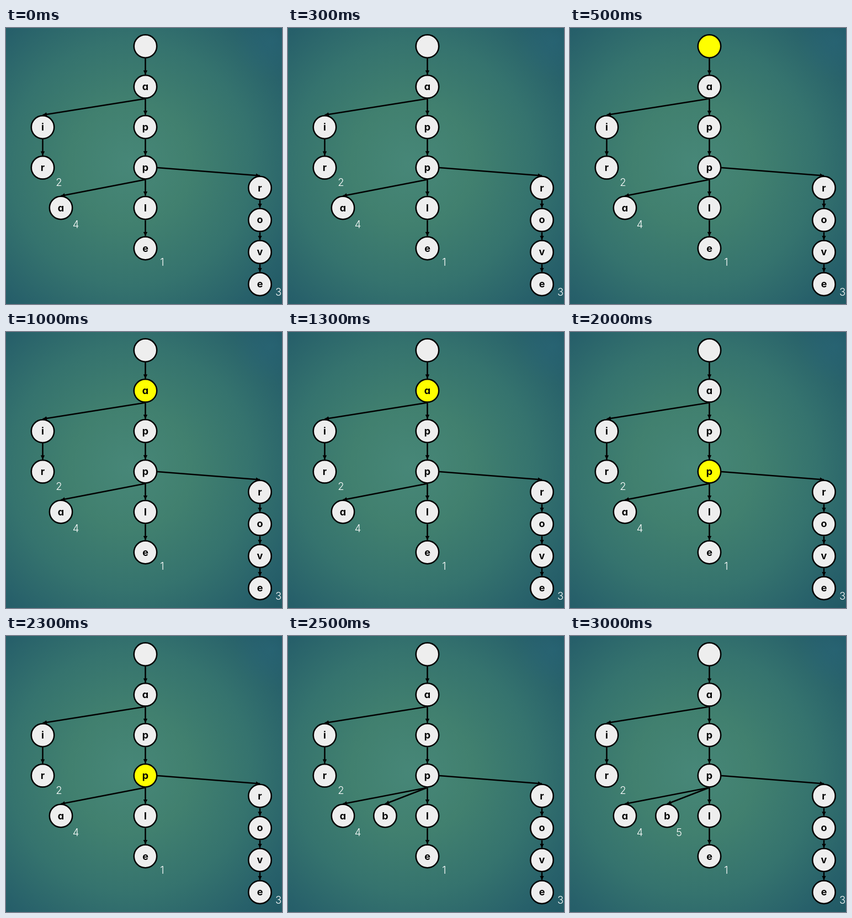
Recreate the animation shown at these times as an HTML page. Size 500x498 px, loop 3500 ms.

```html
<!DOCTYPE html>
<html lang="en">
<head>
<meta charset="utf-8">
<title>Trie insertion</title>
<style>
  html, body { margin: 0; width: 100%; height: 100%; overflow: hidden; }
  body {
    background:
      radial-gradient(circle at 482px 24px, #2b6a8066, #2b6a8000 70px),
      radial-gradient(circle at 225px 245px, #478778, #41806f 110px, #35736e 220px, #27606a 320px, #1d5461 410px);
  }
  svg { display: block; width: 100vw; height: 100vh; }
  circle { fill: #eee; stroke: #000; stroke-width: 2.5; }
  circle.active { fill: #ff0; }
  line { stroke: #000; stroke-width: 2.5; marker-end: url(#head); }
  text { font: 300 18.5px Inter, sans-serif; text-anchor: middle; fill: #fff; }
  text.letter { font-weight: 700; font-size: 18px; fill: #000; font-feature-settings: "cv11"; }
</style>
</head>
<body>
<svg id="stage" viewBox="0 0 500 498">
  <defs>
    <marker id="head" viewBox="0 0 3 3" refX="3" refY="1.5" markerWidth="3" markerHeight="3" orient="auto">
      <path d="M0 0 3 1.5 0 3Z"/>
    </marker>
  </defs>
</svg>
<script>
const stage = document.getElementById('stage');
const RADIUS = 20.7, EDGE = 22, STEP = 500, STEPS = 7;

function add(tag, attrs, text = '') {
  const el = document.createElementNS('http://www.w3.org/2000/svg', tag);
  for (const key in attrs) el.setAttribute(key, attrs[key]);
  el.textContent = text;
  return stage.appendChild(el);
}

const arrow = (x1, y1, x2, y2) => add('line', { x1, y1, x2, y2 });
const label = (x, y, text) => add('text', { x, y }, text);

function node(x, y, letter) {
  const circle = add('circle', { cx: x, cy: y, r: RADIUS });
  const text = add('text', { x, y: y + 6, class: 'letter' }, letter);
  return [circle, text];
}

// A vertical run of nodes joined by arrows; returns their circles.
function chain(x, y, gap, letters) {
  return letters.map((letter, i) => {
    const cy = y + i * gap;
    if (i) arrow(x, cy - gap + EDGE, x, cy - EDGE);
    return node(x, cy, letter)[0];
  });
}

arrow(252.5, 127.5, 66.5, 157);
arrow(274, 252, 460, 266.5);
arrow(252.5, 273.5, 99.5, 303);
const newArrow = arrow(252.5, 273.5, 176, 303);

const path = chain(252.5, 33, 72.9, ['', 'a', 'p', 'p', 'l', 'e']).slice(0, 4);
chain(66.5, 179, 72.9, ['i', 'r']);
chain(460, 288.5, 57.9, ['r', 'o', 'v', 'e']);
node(99.5, 324.5, 'a');
const newNode = [newArrow, ...node(176, 324.5, 'b')];

label(283, 429, '1');
label(96, 284.5, '2');
label(493.5, 483, '3');
label(126.5, 360.5, '4');
const newLabel = label(197.5, 360.5, '5');

const show = (el, on) => el.setAttribute('visibility', on ? 'visible' : 'hidden');

function draw(time) {
  const step = Math.floor(time / STEP) % STEPS;
  path.forEach((circle, i) => circle.classList.toggle('active', step === i + 1));
  newNode.forEach(el => show(el, step >= 5));
  show(newLabel, step === 6);
}

function tick() {
  draw(performance.now());
  requestAnimationFrame(tick);
}
tick();
</script>
</body>
</html>
```
